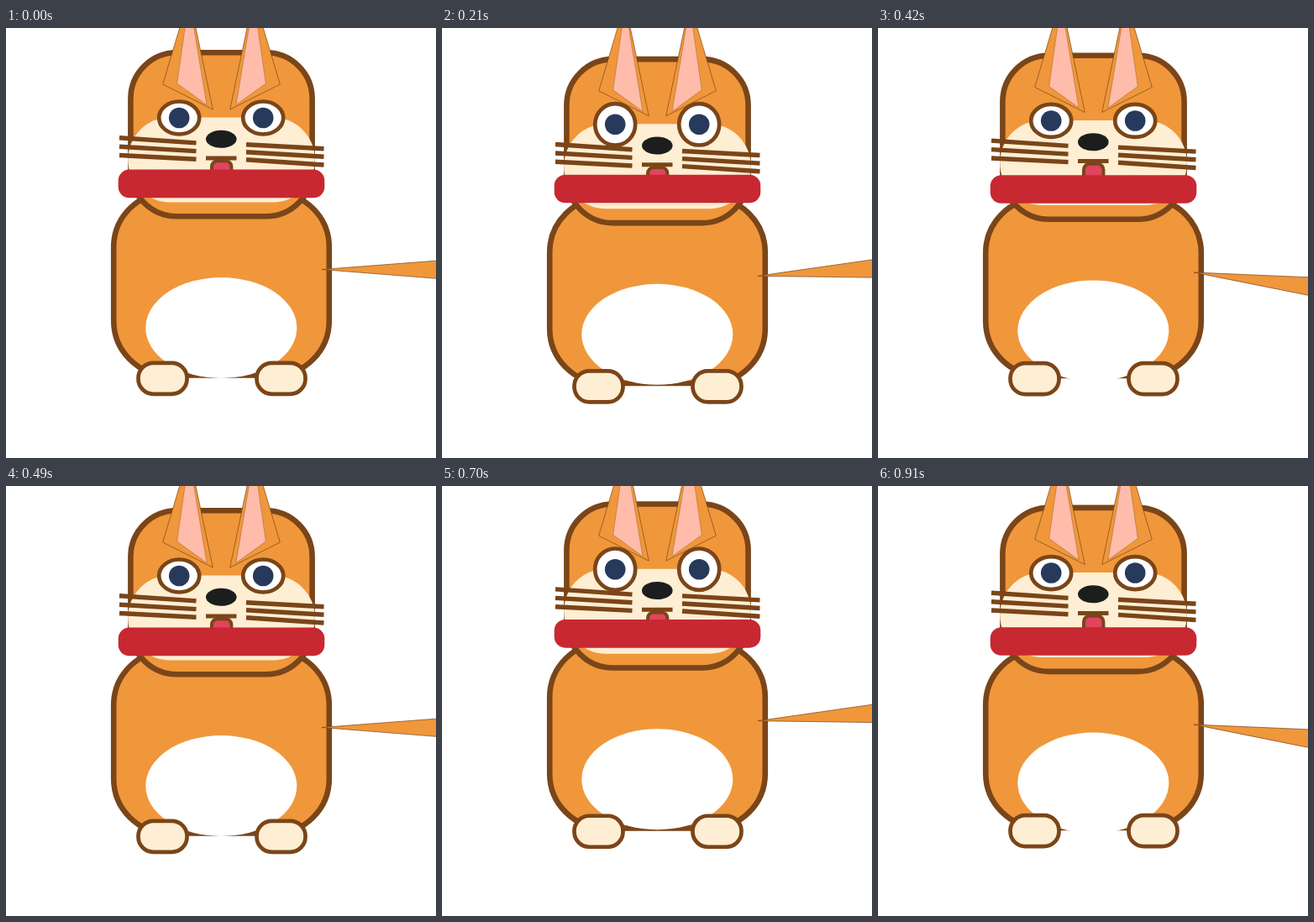
Write an HTML page that moves like this. It is 512x512 px and loops after 980 ms.

```html
<!DOCTYPE html>
<html lang="en">
<head>
<meta charset="utf-8">
<title>Bobbing cat</title>
<style>
  html, body { margin: 0; width: 100%; height: 100%; overflow: hidden; background: #fff; }
  svg { display: block; width: 100vw; height: 100vh; }
  .fur { fill: #f0973b; }
  .cream { fill: #feeed3; }
  .line { stroke: #7a4519; }
  .thick { stroke-width: 6.6; }
  .mid { stroke-width: 4.7; }
  .thin { stroke-width: .7; }
</style>
</head>
<body>
<svg viewBox="0 0 512 512">
  <defs>
    <g id="ear">
      <path class="fur line thin" d="M186.7 67L218 -38L246.3 97Z"/>
      <path class="line thin" fill="#ffbcaa" stroke-opacity=".5" d="M203.7 66L218 -34L239 91.5Z"/>
    </g>
  </defs>
  <g id="cat">
    <rect id="body" class="fur line thick" x="128.2" width="256.6" rx="65"/>
    <ellipse cx="256.3" cy="357" rx="90" ry="60" fill="#fff"/>
    <path id="tail" class="fur line thin" d="M376 287.5L540 275V300.5Z"/>
    <g id="feet" class="cream line mid">
      <rect x="157.5" y="398.8" width="58" height="37" rx="18"/>
      <rect x="298.5" y="398.8" width="58" height="37" rx="18"/>
    </g>
    <rect class="fur line thick" x="148.4" y="29.3" width="216.2" height="195" rx="55"/>
    <rect class="cream" x="145.2" y="106.5" width="222.6" height="101" rx="50"/>
    <use href="#ear"/>
    <use href="#ear" transform="translate(513) scale(-1 1)"/>
    <g class="line mid" fill="#fff">
      <ellipse class="eye" cx="206.2" cy="107" rx="24"/>
      <ellipse class="eye" cx="306.2" cy="107" rx="24"/>
    </g>
    <g fill="#283a5c">
      <circle cx="206.2" cy="107" r="12.3"/>
      <circle cx="306.2" cy="107" r="12.3"/>
    </g>
    <ellipse cx="256.3" cy="132.3" rx="18.3" ry="10.5" fill="#1c1e1e"/>
    <path class="line" stroke-width="5.4" fill="none" d="M135 130.7L226.5 136.9M135 141.2L226.5 146.6M135 151.5L226.5 156.2
      M286 138.7L378.5 143.7M286 147.8L378.5 153.3M286 156.8L378.5 163"/>
    <rect class="line" x="245" y="158.2" width="23.4" height="28" rx="7" fill="#e2445e" stroke-width="4"/>
    <path class="line" stroke-width="5" d="M238 155H274.5"/>
    <rect id="collar" x="133.7" y="168.6" width="245.6" height="33.6" rx="13" fill="#c82832"/>
  </g>
</svg>
<script>
  const STEP = 70, STEPS = 14;
  const get = id => document.getElementById(id);
  const set = (el, attrs) => {
    for (const name in attrs) el.setAttribute(name, attrs[name]);
  };
  const cat = get('cat'), body = get('body'), tail = get('tail');
  const feet = get('feet'), collar = get('collar');
  const eyes = document.querySelectorAll('.eye');

  function draw(time) {
    const phase = Math.floor(time / STEP) % STEPS / STEPS * 2 * Math.PI;
    const bob = 8 * Math.sin(phase);
    const wave = Math.sin(2 * phase);
    const breath = 4 * wave;

    set(cat, { transform: `translate(0 ${bob})` });
    set(body, { y: 196 - breath, height: 217.5 + 2 * breath });
    set(feet, { transform: `translate(0 ${breath})` });
    set(collar, { transform: `translate(0 ${-breath})` });
    set(tail, { transform: `rotate(${-8.7 * wave} 376 287.5)` });
    eyes.forEach(eye => set(eye, { ry: 19.5 + 12 * Math.max(0, wave) }));
  }

  function tick() {
    draw(performance.now());
    requestAnimationFrame(tick);
  }
  tick();
</script>
</body>
</html>
```
